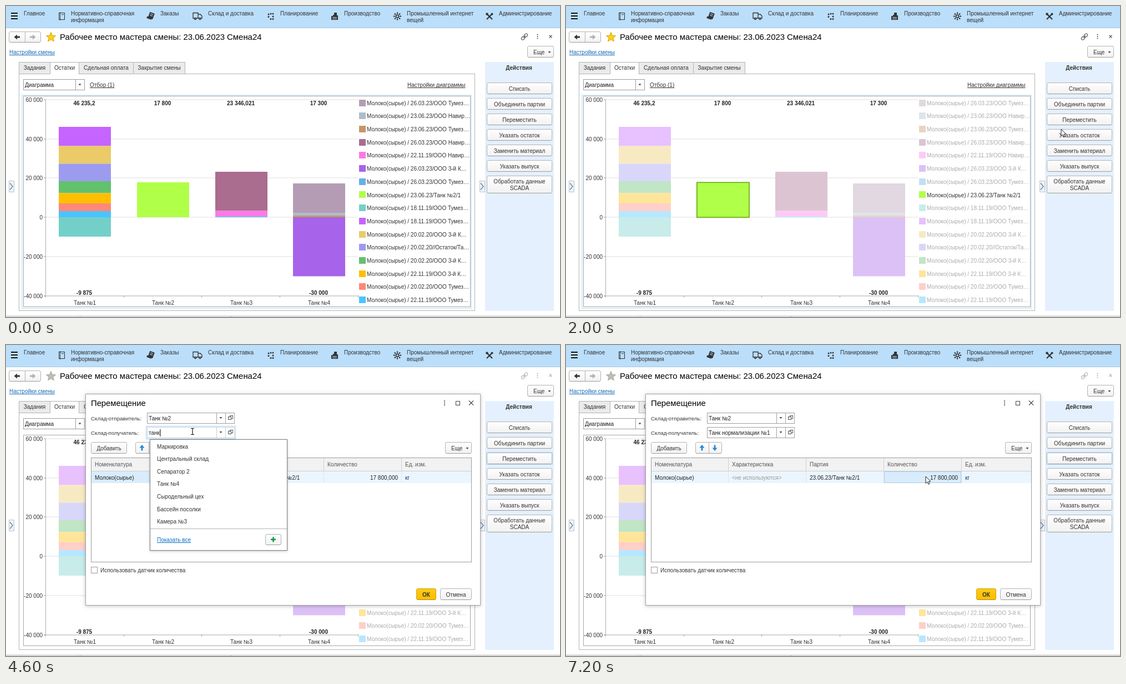
An HTML page with a canvas that plays this animation: 998 by 561 pixels, repeating every 8000 ms.

```html
<!DOCTYPE html>
<html lang="ru">
<head>
<meta charset="utf-8">
<title>Рабочее место мастера смены</title>
<style>
html, body { margin: 0; width: 100%; height: 100%; overflow: hidden; background: #fff; }
canvas { display: block; }
</style>
</head>
<body>
<canvas id="stage" width="998" height="561"></canvas>
<script>
const c = document.getElementById('stage').getContext('2d');
const SANS = '"Liberation Sans", Arial, sans-serif';
const WIDE = '"DejaVu Sans", Verdana, sans-serif';
const INK = '#333333', LINE = '#aaaaaa', BLUE = '#bbdefb';
const LOOP = 8000, STEP = 200;

// ---- drawing helpers ----
function text(s, x, y, o = {}) {
  const size = o.size || 10;
  c.font = (o.bold ? 'bold ' : '') + size + 'px ' + (o.font || SANS);
  c.textAlign = o.align || 'left';
  c.fillStyle = o.color || INK;
  c.fillText(s, x, y + size * 0.36);
  if (o.under) {
    const w = c.measureText(s).width;
    c.fillRect(x, Math.round(y + 4.4), w, 1);
  }
}
function fill(x, y, w, h, color) {
  c.fillStyle = color;
  c.fillRect(x, y, w, h);
}
function frame(x, y, w, h, color, bg) {
  if (bg) fill(x, y, w, h, bg);
  c.strokeStyle = color;
  c.lineWidth = 1;
  c.strokeRect(x + .5, y + .5, w - 1, h - 1);
}
function path(points, color, width, close) {
  c.beginPath();
  for (let i = 0; i < points.length; i += 2) c.lineTo(points[i], points[i + 1]);
  if (close) c.closePath();
  if (width) { c.strokeStyle = color; c.lineWidth = width; c.stroke(); }
  else { c.fillStyle = color; c.fill(); }
}
function dot(x, y, r, color) {
  c.beginPath();
  c.arc(x, y, r, 0, 7);
  c.fillStyle = color;
  c.fill();
}
function ring(x, y, r, color, width, a = 0, b = Math.PI * 2) {
  c.beginPath();
  c.arc(x, y, r, a, b);
  c.strokeStyle = color;
  c.lineWidth = width;
  c.stroke();
}
function shadowed(blur, draw) {
  c.save();
  c.shadowColor = 'rgba(0,0,0,.25)';
  c.shadowBlur = blur;
  c.shadowOffsetY = 1;
  draw();
  c.restore();
}
function button(x, y, w, h, label, o = {}) {
  const g = c.createLinearGradient(0, y, 0, y + h);
  g.addColorStop(0, o.top || '#ffffff');
  g.addColorStop(1, o.bottom || '#f1f1f1');
  c.beginPath();
  c.roundRect(x + .5, y + .5, w - 1, h - 1, 2.5);
  c.fillStyle = g;
  c.fill();
  c.strokeStyle = o.border || '#b2b2b2';
  c.lineWidth = 1;
  c.stroke();
  if (!o.pressed) fill(x + 2, y + h - 1, w - 4, 1, o.edge || '#9c9c9c');
  if (label) text(label, x + w / 2, y + h / 2 + .5, { align: 'center', bold: o.bold });
}
function caretDown(x, y) { path([x - 2.5, y - 1, x + 2.5, y - 1, x, y + 2], '#444', 0); }
function moreButton(x, y) {
  button(x, y, 48, 21);
  text('Еще', x + 11, y + 11);
  caretDown(x + 40, y + 11);
}
function cross(x, y, r, color, w) {
  path([x - r, y - r, x + r, y + r], color, w);
  path([x - r, y + r, x + r, y - r], color, w);
}
function arrow(x, y, dx, dy, color) {
  c.save();
  c.translate(x, y);
  c.rotate(Math.atan2(dy, dx));
  path([5.5, 0, 0, -4.5, 0, -1.4, -5, -1.4, -5, 1.4, 0, 1.4, 0, 4.5], color, 0, true);
  c.restore();
}
const rgb = h => [1, 3, 5].map(i => parseInt(h.substr(i, 2), 16));
function mix(a, b, k) {
  const p = rgb(a), q = rgb(b);
  return '#' + p.map((v, i) => Math.round(v + (q[i] - v) * k).toString(16).padStart(2, '0')).join('');
}
// last row whose time has come
const at = (rows, t) => rows.filter(r => r[0] <= t).pop();

// ---- data ----
const A = '/ООО Тумез…', B = '/ООО Навир…', M = '/ООО 3-й К…';
const series = [
  ['#b49db4', '26.03.23' + A], ['#b0bdc9', '23.06.23' + B],
  ['#c59767', '23.06.23' + A], ['#aa6c8f', '26.03.23' + B],
  ['#ff78e6', '22.11.19' + B], ['#a763e9', '26.03.23' + M],
  ['#64b0ea', '26.03.23' + A], ['#b0ff48', '23.06.23/Танк №2/1'],
  ['#73d0c8', '18.11.19' + A], ['#c664ff', '18.11.19' + A],
  ['#ebca68', '20.02.20' + M], ['#9d9bf0', '20.02.20//Остаток/Та…'],
  ['#62c16d', '20.02.20' + M], ['#ffbf00', '22.11.19' + M],
  ['#ff8878', '20.02.20' + A], ['#4ac4ff', '22.11.19' + A]
];
const PINK = 4, VIOLET = 5, LIME = 7;
// x, first edge, then series and lower edge of every block
const bars = [
  [95, 218, 9, 252.5, 10, 284.5, 11, 316, 12, 337.5, 13, 356, 14, 370, 15, 381, 8, 416],
  [236, 318, 7, 381],
  [377, 299, 3, 369.5, 4, 379.5, 6, 381],
  [517, 320, 0, 373, 1, 378, 2, 381, 5, 487.5]
];
const totals = ['46 235,2', '17 800', '23 346,021', '17 300'];
const lows = ['-9 875', '', '', '-30 000'];
const actions = ['Списать', 'Объединить партии', 'Переместить', 'Указать остаток',
  'Заменить материал', 'Указать выпуск'];
const places = ['Маркировка', 'Центральный склад', 'Сепаратор 2', 'Танк №4',
  'Сыродельный цех', 'Бассейн посолки', 'Камера №3'];
const tanks = ['№1', '№2', '№3', '№4', 'масла', ...[1, 2, 3, 4].map(n => 'нормализации №' + n)];

const pointer = [
  [0], [400, 6, 326], [600, 128, 344], [800, 258, 352], [1000, 286, 350],
  [1200, 420, 373], [1400, 548, 402], [1600, 871, 262], [1800, 884, 245],
  [2000, 892, 222], [2200, 890, 208], [2400, 885, 202], [2600, 886, 202, 'busy'],
  [3000, 620, 186], [3200, 362, 163], [3400, 340, 157, 'beam'], [3800, 336, 156, 'beam'],
  [5200, 334, 159, 'beam'], [5400, 333, 178], [5600, 338, 222], [5800, 343, 264],
  [6000, 346, 289], [6400, 385, 281], [6600, 480, 262], [6800, 592, 244],
  [7000, 645, 239], [7200, 648, 237]
];
const typed = [[0, ''], [4200, 'т'], [4400, 'тан'], [4600, 'танк'], [6200, 'Танк нормализации №1']];
const fade = [[0, 1], [800, .7], [1000, .42], [1200, .25], [1400, .15], [1600, .1]];
const pinkFade = [[1200, 1], [1400, .65], [1600, .36]];
const violetFade = [[1400, 1], [1600, .68]];

// ---- series colours over time ----
function level(i, t) {
  if (i === LIME) return 1;
  const own = i === PINK ? at(pinkFade, t) : i === VIOLET ? at(violetFade, t) : null;
  return (own || at(fade, t))[1];
}
const tint = t => t < 1800 ? 0 : t < 2000 ? .55 : 1;
function shade(i, t) {
  const base = series[i][0];
  if (i === LIME) return base;
  return mix(mix('#c9cacb', base, level(i, t)), mix(base, '#ffffff', .6), tint(t));
}

// ---- header ----
function icons() {
  const k = '#333';
  for (const y of [13, 18, 23]) fill(9, y - 1, 12, 2, '#111');
  frame(95, 12, 11, 13, k);
  fill(97, 11, 1, 15, k);
  fill(100, 15, 4, 1, k);
  c.save();
  c.translate(262, 18);
  c.rotate(.35);
  fill(-5, -6, 9, 11, k);
  for (const y of [-4, -1]) fill(-3, y, 5, 1.2, BLUE);
  fill(-7, 3, 9, 3.5, k);
  c.restore();
  path([346, 22, 337, 22, 337, 12.5, 346, 12.5, 346, 22, 353, 22, 353, 18, 350, 15, 346, 15], k, 1.3);
  for (const x of [341, 349.5]) { dot(x, 23, 2.2, k); dot(x, 23, .8, BLUE); }
  for (const [x, y] of [[473, 15], [477, 14], [481, 14], [473, 19.5], [481, 19], [477, 23.5], [481, 23.5]])
    dot(x, y, 1.5, k);
  path([586, 25, 586, 18, 589, 18, 589, 16, 591, 16, 591, 12, 596, 12, 596, 17, 598, 17, 598, 25], k, 0);
  fill(588, 20, 8, 1, BLUE);
  fill(588, 22.5, 8, 1, BLUE);
  for (let i = 0; i < 8; i++) {
    const a = i * Math.PI / 4, x = Math.cos(a), y = Math.sin(a);
    path([705 + x * 2, 18.5 + y * 2, 705 + x * 6, 18.5 + y * 6], k, 1.1);
    dot(705 + x * 6, 18.5 + y * 6, 1.2, k);
  }
  ring(705, 18.5, 2.4, k, 1.3);
  cross(871, 19, 5, k, 2.2);
  dot(866.5, 14.5, 2.2, k);
  dot(875.5, 14.5, 2, k);
}
function star(on) {
  const p = [];
  for (let i = 0; i < 10; i++) {
    const a = i * Math.PI / 5 - Math.PI / 2, r = i % 2 ? 4.1 : 9;
    p.push(81 + r * Math.cos(a), 56.5 + r * Math.sin(a));
  }
  path(p, on ? '#ffcd1c' : '#bdbdb8', 0, true);
  path(p, on ? '#d9a400' : '#aaaaa4', 1, true);
}
function header(modal) {
  fill(0, 0, 998, 39, BLUE);
  fill(0, 39, 998, 1, '#a9c9e4');
  icons();
  for (const [x, a, b] of [[32, 'Главное'], [117, 'Нормативно-справочная', 'информация'],
    [278, 'Заказы'], [364, 'Склад и доставка'], [494, 'Планирование'], [609, 'Производство'],
    [722, 'Промышленный интернет', 'вещей'], [888, 'Администрирование']]) {
    text(a, x, 13);
    if (b) text(b, x, 25.5);
  }
  button(5, 46, 58, 20);
  fill(34, 47, 1, 18, '#b2b2b2');
  arrow(20, 56, -1, 0, '#333');
  arrow(48, 56, 1, 0, '#b0b0b0');
  star(!modal);
  text('Рабочее место мастера смены: 23.06.2023 Смена24', 97, 55.5, { size: 14.9, color: '#000' });
  const k = modal ? '#b5b5b5' : '#555';
  c.save();
  c.translate(934, 55.5);
  c.rotate(-Math.PI / 4);
  c.strokeStyle = k;
  c.lineWidth = 1.2;
  for (const x of [-7, 0]) { c.beginPath(); c.roundRect(x, -2.5, 7, 5, 2.5); c.stroke(); }
  path([-3, 0, 3, 0], k, 1.2);
  c.restore();
  for (const y of [51.5, 55, 58.5]) dot(957.5, y, 1.1, k);
  cross(981, 55, 2.5, k, 1.1);
  text('Настройки смены', 6, 83.5, { color: '#1c6cb8', under: true });
  moreButton(939, 72);
}

// ---- main area ----
function tabs() {
  frame(23, 122, 822, 428, '#b4b4b4', '#fff');
  for (const [x, w, s] of [[23, 57, 'Задания'], [131, 99, 'Сдельная оплата'], [229, 94, 'Закрытие смены'], [79, 53, 'Остатки']]) {
    const on = x === 79;
    frame(x, 101, w, 22, '#b4b4b4', on ? '#fff' : '#ebebeb');
    if (on) fill(x + 1, 121, w - 2, 3, '#fff');
    text(s, x + w / 2, 111.5, { align: 'center' });
  }
  frame(31, 132, 111, 20, '#9c9c9c', '#fff');
  fill(125, 132, 1, 20, '#9c9c9c');
  text('Диаграмма', 34, 142.5, { color: '#222' });
  caretDown(133, 141.5);
  text('Отбор (1)', 151, 142.5, { under: true });
  text('Настройки диаграммы', 723, 142.5, { under: true });
}
function chart(t) {
  if (t < 2400) {
    frame(28, 160, 811, 386, '#cfe6f8');
    frame(29, 161, 809, 384, '#e6f3fd');
  }
  frame(31, 162, 806, 381, '#a6a6a6', '#fff');
  for (let i = 0; i < 6; i++) {
    const y = Math.round(169 + i * 70.7);
    fill(68, y - .5, 566, 1, i === 5 ? LINE : '#dfdfdf');
    fill(68, y - .5, 4, 1, LINE);
    const v = 60 - i * 20;
    text(v ? v + ' 000' : '0', 66, y + .5, { align: 'right' });
  }
  fill(71, 169, 1, 354, LINE);
  for (let i = 0; i < 5; i++) fill(71 + Math.round(i * 140.7), 522, 1, 4, LINE);
  bars.forEach((b, i) => {
    const mid = b[0] + 47;
    for (let j = 2, y = b[1]; j < b.length; y = b[j + 1], j += 2)
      fill(b[0], y, 94, b[j + 1] - y, shade(b[j], t));
    text(totals[i], mid - 1, 175.5, { bold: true, align: 'center', color: '#222' });
    text(lows[i], mid - 1, 517, { bold: true, align: 'center', color: '#222' });
    text('Танк №' + (i + 1), mid, 535.5, { align: 'center' });
  });
  if (t >= 1000) {
    c.strokeStyle = '#63a80c';
    c.lineWidth = 1.6;
    c.strokeRect(235.8, 318.3, 94.2, 63);
  }
  series.forEach((s, i) => {
    const y = 174.5 + i * 23.7;
    fill(636, Math.round(y - 6), 12, 12, shade(i, t));
    const ink = i === LIME ? INK : mix(mix('#c2c2c2', INK, level(i, t)), '#ababab', tint(t));
    text('Молоко(сырье) / ' + s[1], 650, y + .5, { color: ink });
  });
}
function chevron(x) {
  frame(x, 315, 10, 21, '#b9c7d4', '#edf3f9');
  path([x + 2, 319.5, x + 7, 325.5, x + 2, 331.5], '#667788', 1.2);
}
function side(t) {
  fill(863, 101, 124, 449, '#e4f0fd');
  text('Действия', 924, 111.5, { bold: true, align: 'center' });
  actions.forEach((s, i) => {
    const y = 138 + i * 28, used = i === 2 && t >= 2400, down = used && t < 3000;
    if (used && !down) frame(865, y - 1, 120, 23, '#b4daf5');
    button(866, y, 118, 21, s,
      down ? { pressed: true, top: '#dedede', bottom: '#e9e9e9', border: '#777' } : {});
  });
  button(866, 306, 118, 32);
  text('Обработать данные', 925, 316, { align: 'center' });
  text('SCADA', 925, 328.5, { align: 'center' });
  chevron(5);
  chevron(853);
}
function footer() {
  fill(0, 559, 998, 1, '#a8a8a8');
  for (const x of [133, 405]) fill(x, 559, 1, 2, '#a8a8a8');
}

// ---- dialog ----
function field(y, value, focus) {
  if (focus) frame(252, y - 2, 162, 24, '#a6d3f5', '#fff');
  const edge = focus ? '#c4cdd5' : '#a0a0a0';
  frame(254, y, 158, 20, edge, '#fff');
  fill(379, y, 1, 20, edge);
  fill(395, y, 1, 20, edge);
  caretDown(387, y + 9);
  frame(403, y + 5, 6, 6, '#555');
  frame(400, y + 7, 6, 6, '#555', '#fff');
  text(value, 257, y + 10, { color: '#222' });
}
function dialog(t) {
  shadowed(6, () => fill(143, 88, 712, 382, '#fff'));
  frame(143, 88, 712, 382, '#a4a4a4', '#fff');
  text('Перемещение', 153, 105, { size: 14.8, color: '#000' });
  for (const y of [101, 104.5, 108]) dot(790, y, 1.1, '#444');
  frame(810, 101, 8, 8, '#444');
  cross(838, 104.5, 4, '#444', 1.1);
  text('Склад-отправитель:', 153, 132, { size: 9.8 });
  text('Склад-получатель:', 153, 158.5, { size: 9.8 });
  const sender = t < 3400, open = t >= 3600 && t < 6200;
  field(122, 'Танк №2', sender);
  if (sender) {
    fill(257, 125, 41, 13, '#4a69bd');
    text('Танк №2', 257, 132, { color: '#fff' });
  }
  const value = at(typed, t)[1];
  field(148, value, t >= 3400 && t < 7000);
  if (t >= 3400 && t < 5200) fill(257.5 + c.measureText(value).width, 152, 1, 13, '#000');
  button(153, 175, 65, 21, 'Добавить');
  button(233, 175, 48, 21);
  fill(257, 176, 1, 19, '#b2b2b2');
  arrow(245, 185.5, 0, -1, '#2786d4');
  arrow(268, 185.5, 0, 1, '#2786d4');
  moreButton(791, 175);

  frame(153, 203, 686, 189, '#9d9d9d', '#fff');
  fill(154, 204, 684, 23, '#f2f2f2');
  fill(154, 227, 684, 1, '#cfcfcf');
  fill(154, 228, 684, 21, '#ebf5fd');
  const last = t >= 7000;
  if (last) frame(573, 228, 139, 21, '#a8cdea', '#d9ecfb');
  else fill(154, 228, 138, 21, '#d9ecfb');
  [[160, 'Номенклатура'], [299, 'Характеристика'], [439, 'Партия'], [579, 'Количество'], [719, 'Ед. изм.']]
    .forEach(([x, s], i) => {
      text(s, x, 215, { color: '#555' });
      if (i) {
        fill(x - 7, 204, 1, 23, '#cfcfcf');
        fill(x - 7, 228, 1, 21, '#dce6ee');
      }
    });
  text('Молоко(сырье)', 160, 239, { color: '#222' });
  text('<не используются>', 299, 239, { color: '#9a9a9a' });
  text('23.06.23/Танк №2/1', 439, 239, { color: '#222' });
  text('17 800,000', 706, 239, { align: 'right', color: '#222' });
  text('кг', 719, 239, { color: '#22306a' });

  frame(153, 400, 12, 12, '#9a9a9a', '#fff');
  text('Использовать датчик количества', 170, 406);
  button(739, 439, 36, 21, 'ОК', { bold: true, top: '#ffcb14', bottom: '#fabd00', border: '#c9a227', edge: '#a98a20' });
  button(782, 439, 57, 21, 'Отмена');
  if (open) dropdown(t);
}
function dropdown(t) {
  const found = t >= 4800, list = found ? tanks : places;
  const end = 171 + list.length * 22.6 + 1.5;
  const h = Math.round(end + 40 - 170);
  shadowed(4, () => fill(259, 170, 248, h, '#fff'));
  frame(259, 170, 248, h, '#808080', '#fff');
  const spot = at(pointer, t);
  list.forEach((s, i) => {
    const y = 183 + i * 22.6;
    if (found && t >= 5400 && Math.abs(spot[2] + 1 - y) < 11.3) fill(260, Math.round(y - 11.3), 246, 22, BLUE);
    if (found) text('Танк', 272, y, { bold: true, size: 10.6, font: WIDE, color: '#0b8f3c' });
    text(s, found ? 302.5 : 272, y);
  });
  fill(260, Math.round(end), 246, 1, '#b4b4b4');
  text('Показать все', 272, end + 21, { color: '#0a6fc2', under: true });
  const y = Math.round(end + 10);
  button(467, y, 29, 20);
  fill(477, y + 8.5, 9, 2.6, '#12964a');
  fill(480.2, y + 5.3, 2.6, 9, '#12964a');
}

// ---- pointer ----
function drawPointer(t) {
  const [, x, y, kind] = at(pointer, t);
  if (x === undefined) return;
  if (kind === 'busy') {
    ring(x, y, 6, '#2a86cc', 5);
    const a = t / 250;
    ring(x, y, 6, '#6fc0f2', 4, a, a + 2.4);
  } else if (kind === 'beam') {
    path([x - 3, y - 5.5, x + 3, y - 5.5], '#111', 1);
    path([x - 3, y + 5.5, x + 3, y + 5.5], '#111', 1);
    path([x, y - 5.5, x, y + 5.5], '#111', 1.2);
  } else {
    const p = [0, 0, 0, 12.5, 2.9, 9.9, 4.9, 14.3, 6.9, 13.4, 5, 9.2, 8.8, 9];
    const q = p.map((v, i) => v + (i % 2 ? y : x));
    path(q, '#fff', 0, true);
    path(q, '#222', 1, true);
  }
}

function draw() {
  const t = Math.floor(performance.now() % LOOP / STEP) * STEP;
  const modal = t >= 3000;
  fill(0, 0, 998, 561, '#fff');
  header(modal);
  tabs();
  chart(t);
  side(t);
  footer();
  if (modal) dialog(t);
  drawPointer(t);
  requestAnimationFrame(draw);
}
draw();
</script>
</body>
</html>
```
